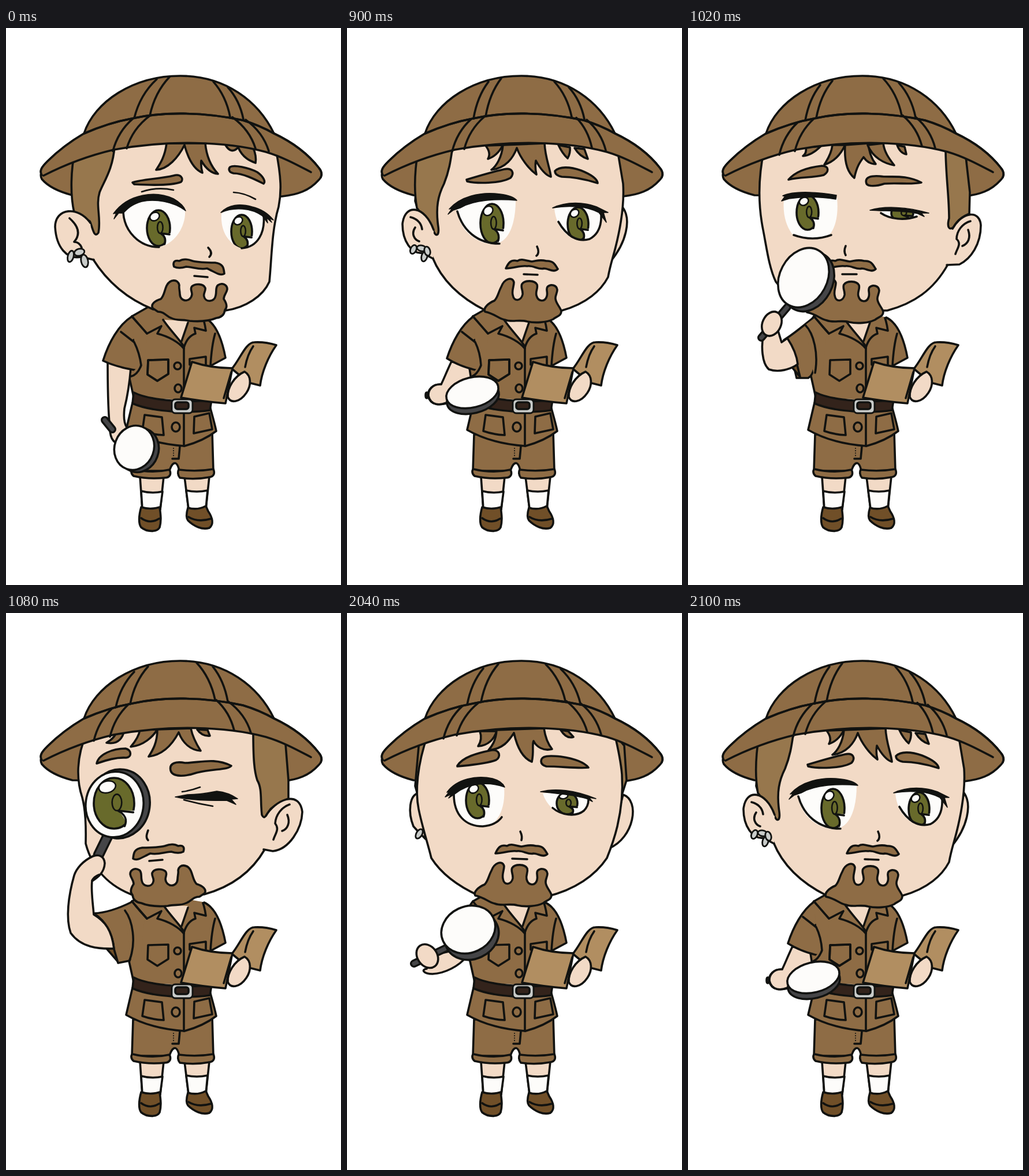
Write an HTML page that moves like this. It is 580x966 px and loops after 2160 ms.

```html
<!DOCTYPE html>
<html lang="en">
<head>
<meta charset="utf-8">
<title>Explorer</title>
<style>
html, body { margin: 0; width: 100%; height: 100%; overflow: hidden; background: #fff; }
svg { display: block; width: 100%; height: 100%; stroke: #111210; stroke-width: 3.6; stroke-linejoin: round; stroke-linecap: round; fill: none; }
.brown { fill: #8e6c45; }
.side { fill: #97774d; }
.skin { fill: #f2dac6; }
.white { fill: #fdfcfa; }
.iris { fill: #686a2b; }
.ink { fill: #111210; stroke-width: 1.5; }
.dark { fill: #454547; }
.belt { fill: #33231b; }
.paper { fill: #b18e61; }
.shoe { fill: #704f28; }
.metal { fill: #c9ccca; stroke-width: 2.8; }
.bare { stroke: none; }
.thin { stroke-width: 2.6; }
.pupil * { vector-effect: non-scaling-stroke; }
</style>
</head>
<body>
<svg id="stage" viewBox="0 0 580 966"></svg>
<script>
const path = (cls, ...ds) => ds.map(d => `<path class="${cls}" d="${d}"/>`).join('');
const line = (...ds) => path('line', ...ds);
const oval = (cls, x, y, rx, ry, turn = 0) =>
  `<ellipse class="${cls}" rx="${rx}" ry="${ry}" transform="translate(${x} ${y}) rotate(${turn})"/>`;
const place = (art, transform) => `<g transform="${transform}">${art}</g>`;

// Clothes, legs and map stay still.
const body = [
  path('skin', 'M232 778L236 835H267L273 778Z', 'M309 778L316 834H346L352 778Z'),
  path('white', 'M234 803Q252 808 271 804L267 834H236Z', 'M312 802Q330 806 349 802L346 834H316Z'),
  path('shoe', 'M234 831C230 845 229 860 234 866C245 875 262 874 266 866C269 855 268 845 266 831Q250 836 234 831Z',
    'M315 832C312 842 312 850 315 854C325 864 340 871 352 867C360 861 358 850 350 838L346 829Q331 837 315 832Z'),
  line('M234 850Q249 861 265 851', 'M316 848Q332 858 355 851'),
  path('brown', 'M220 705L218 768H283C286 758 290 753 294 755C298 757 299 764 300 768H359L357 700Z',
    'M219 765Q252 773 283 766C287 774 283 780 275 780Q247 783 221 777C216 773 216 767 219 765Z',
    'M299 766Q330 770 359 765C362 772 360 778 352 779Q326 784 301 780C297 775 297 769 299 766Z'),
  line('M301 726L299 747H288'),
  '<path d="M290 729V743" stroke-width="2" stroke-dasharray="0.1 4"/>',
  path('brown bare', 'M246 484L218 500C205 515 200 550 207 592L213 604L221 640L352 648L355 580L362 530L346 502L300 494Z'),
  line('M246 484L218 500C205 515 200 550 207 592L213 604L221 640', 'M355 582L353 648'),
  path('brown', 'M343 502C365 512 375 545 380 572L354 586Q356 551 362 530'),
  path('brown', 'M219 650L208 697Q250 721 309 725Q342 716 364 699C360 680 355 665 352 652Z'),
  path('skin bare', 'M272 506Q288 530 304 546L315 508Z'),
  line('M218 500Q229 514 244 530L269 517L262 530C282 535 299 545 308 556', 'M272 506C284 524 299 538 307 551', 'M315 511L304 543',
    'M308 554C312 541 319 533 328 530L326 520L346 525Q344 511 341 503', 'M308 553V725',
    'M246 576L281 575L281 600L262 612L245 601Z', 'M318 584V574L346 570V584',
    'M240 671L270 675L273 706Q253 705 236 699Z', 'M326 674L352 668L357 696L325 703Z'),
  oval('', 297, 586, 6, 6), oval('', 298, 625, 6, 7), oval('', 294, 692, 7, 8),
  path('belt', 'M221 632C250 647 320 650 356 645L353 663C320 668 255 667 219 651Z'),
  '<rect class="metal" x="287" y="644" width="36" height="24" rx="6"/><rect class="belt" x="293" y="649" width="23" height="12" rx="4"/>',
  path('paper', 'M391 591C405 575 415 545 430 545Q449 544 468 550C454 570 443 596 440 620L420 615Z',
    'M322 579Q355 590 392 590L380 651Q343 648 303 641Z'),
  line('M390 597L377 642', 'M428 552Q418 566 414 588'),
  path('skin', 'M413 596C425 603 425 620 416 633C405 649 389 652 384 640C383 624 395 604 413 596Z')
].join('');

const domeLine = 'C153 128 220 83 302 83C380 83 437 127 464 183';
const brimTop = 'M62 255C57 247 63 240 72 231C96 207 118 193 135 183C165 170 190 162 218 157C270 145 340 145 410 160C430 166 450 175 464 183C500 200 525 221 542 243';
const brimEdge = 'C505 238 480 224 450 215C380 196 280 194 187 211C140 222 100 238 65 256';
const hatBack = path('brown', brimTop + 'C549 252 547 258 541 264C525 282 505 289 478 292L115 290C92 284 72 274 62 262Q58 255 63 244');

const domeY = x => 84 + (x - 302) ** 2 * .0028;
const seamY = x => 148 + (x - 312) ** 2 * .00105;
const edgeY = x => 199 + (x - 320) ** 2 * .0008;
const bend = (x1, y1, x2, y2) =>
  line(`M${x1} ${y1}Q${x2 + (x1 - x2) * .25} ${y1 + (y2 - y1) * .4} ${x2} ${y2}`);

// Each strap: x at crown, at dome rim, at brim start, at brim edge.
const hatFront = straps => [
  path('brown bare', `${brimTop}L528 250${brimEdge}Z`),
  path('brown', `M135 183${domeLine}C450 175 430 166 410 160C340 145 270 145 218 157C190 162 165 170 135 183Z`),
  line(brimTop + 'C547 249 547 254 545 259', `M528 250${brimEdge}`),
  ...straps.map(([a, b, c, d]) => bend(a, domeY(a), b, seamY(b)) + bend(c, seamY(c), d, edgeY(d)))
].join('');

const turnedGoatee = path('brown', 'M254 486C250 479 258 473 268 470C274 464 274 456 278 447C284 435 298 435 300 446C299 452 301 455 301 462C302 476 320 476 322 462C322 456 318 452 322 448C328 443 342 443 345 451C346 457 341 460 343 466C345 476 361 476 363 464C365 457 362 450 367 446C374 441 383 445 383 453C382 460 377 463 377 470C381 476 384 484 379 489C378 498 372 502 364 503C350 509 330 509 318 508C305 505 296 508 286 503C277 500 275 492 263 492Z');
const goatee = path('brown', 'M239 492C235 486 245 477 255 473C261 468 262 458 267 449C272 435 286 430 289 441C289 448 285 455 287 463C289 476 302 473 304 462C305 455 300 449 303 444C308 437 325 437 329 445C331 452 326 456 328 464C331 475 343 476 346 465C348 458 344 453 347 449C353 443 363 446 364 454C364 460 360 464 361 470C362 478 369 484 371 491C371 500 362 500 357 505C345 511 325 512 312 509C298 505 285 511 273 506C260 503 257 496 239 492Z');
const turnedMoustache = path('brown', 'M291 414C288 406 292 402 300 404C308 399 318 402 323 404Q335 407 362 407C376 409 377 416 378 426C370 431 360 422 348 417C335 420 322 414 312 414Q299 418 291 414Z');
const moustache = path('brown', 'M275 417C279 408 283 401 295 404C303 399 310 404 320 405C329 404 333 401 345 404C358 403 361 412 365 418C358 425 349 417 341 417C332 420 322 411 312 413C300 411 290 417 275 417Z');
const mirror = art => place(art, 'translate(598 0) scale(-1 1)');

const iris = (x, y, rx, ry) => `<g class="pupil" transform="translate(${x} ${y}) scale(${rx / 21} ${ry / 31})">` + [
  oval('iris', 0, 0, 21, 31),
  path('white bare', 'M4 9L23 9L20 24L12 32C14 20 8 14 4 9Z'),
  line('M20 11L4 9C12 14 14 20 11 28'),
  oval('iris thin', 3, -1, 5, 10),
  oval('white thin', -7, -20, 9, 7, -25)
].join('') + '</g>';

let eyes = 0;
const eye = (white, outline, lash, pupil) => {
  const id = 'eye' + eyes++;
  return `<clipPath id="${id}"><path d="${white}"/></clipPath>` + path('white bare', white) +
    `<g clip-path="url(#${id})">${iris(...pupil)}</g>` + line(outline) + path('ink', lash);
};

const lens = (x, y, rx, ry, turn, dx, dy) =>
  oval('dark', x + dx, y + dy, rx, ry, turn) + oval('white', x, y, rx, ry, turn);
const handle = (d, width = 14) =>
  `<path d="${d}" stroke-width="${width}"/><path d="${d}" stroke="#454547" stroke-width="${width - 7}"/>`;

const poses = {
  reading: {
    arm: path('skin', 'M176 580C176 620 176 660 180 695C180 714 189 723 200 720L215 700C205 690 203 680 205 660C210 640 214 615 216 590Z') +
      path('brown', 'M217 501C195 515 178 545 168 577Q190 588 228 594L234 584C232 568 228 553 221 541') +
      path('brown bare', 'M217 503L222 541L232 584L216 600L236 602L245 531Z') +
      line('M218 500L244 530', 'M199 527L222 545C228 557 232 570 234 585Q228 601 217 604', 'M246 576L281 575L281 600L262 612L245 601Z') +
      handle('M171 680L184 696') + lens(222, 728, 34, 39, 20, 8, 4),
    face: path('skin', 'M125 212L115 300L150 400C175 440 210 470 255 488L380 490C415 485 445 465 456 440C460 400 460 350 472 310C477 285 477 260 467 210Q300 165 125 212Z') +
      path('side', 'M120 210C112 245 111 290 118 320L145 335C150 345 152 366 160 355C165 330 155 308 162 285C170 265 185 245 188 205Z') +
      path('skin', 'M146 338C125 308 85 312 85 345C87 380 105 402 130 397L152 402') +
      line('M110 330C126 344 129 358 118 371Q127 371 131 381') +
      oval('metal', 112, 396, 5, 10, 15) + oval('metal', 127, 389, 9, 6, -15) + oval('metal', 136, 404, 6, 11, -12),
    hair: path('brown', 'M278 200C275 225 265 238 260 246C280 245 298 225 309 203C315 225 325 245 340 251Q337 240 338 230C345 242 355 252 367 253C354 239 347 222 345 200Z',
        'M380 203Q390 220 402 207C410 226 424 231 432 234Q434 222 428 208L390 200Z') +
      path('brown', 'M219 268C235 262 265 262 290 256C303 252 308 262 303 267C285 274 240 272 222 271Z',
        'M388 241C395 237 420 242 435 250C445 257 450 266 446 270C430 262 410 252 394 252C385 250 385 244 388 241Z') +
      path('thin', 'M235 284Q262 275 290 281', 'M394 285Q413 286 432 297'),
    eyes: eye('M203 320C225 294 275 292 310 316C312 345 290 380 258 380C225 378 204 352 203 320Z', 'M203 320C205 352 230 380 265 380',
        'M187 331L191 321L186 322C212 286 260 282 290 296C302 303 308 309 311 317C290 301 258 296 235 301C215 307 209 315 203 321L195 321Z', [264, 347, 20, 31]) +
      eye('M373 322C392 307 430 308 446 324C448 355 435 382 408 382C385 375 371 352 373 322Z', 'M446 324C449 355 436 380 408 382',
        'M372 320C385 306 405 304 426 310C443 314 455 323 463 333L456 330L460 337L451 329L453 338L444 326C425 312 395 310 372 320Z', [408, 353, 18, 29]),
    nose: 'M350 381C357 388 356 393 352 397M326 430L349 432',
    moustache: turnedMoustache, goatee: turnedGoatee,
    straps: [[261, 222, 220, 185], [283, 249, 249, 209], [359, 388, 392, 432], [384, 411, 415, 455]]
  },
  lifting: {
    arm: path('skin', 'M181 578C172 597 168 608 163 618C148 617 140 628 140 638C145 656 162 654 176 650L215 610L212 590Z') +
      path('brown', 'M218 501C198 515 182 545 173 573Q195 587 226 594L233 584C231 568 228 553 221 541') +
      path('brown bare', 'M218 503L222 541L231 584L216 600L236 602L245 531Z') +
      line('M218 500L244 530', 'M199 527L222 545C228 557 231 570 232 585Q226 600 217 604', 'M246 576L281 575L281 600L262 612L245 601Z') +
      oval('dark', 138, 637, 2, 5) + path('skin', 'M163 618C148 617 140 628 141 638C145 656 162 654 172 650') +
      lens(217, 632, 46, 26, -14, 1, 10),
    face: path('skin', 'M478 312C492 332 484 372 456 405Z') +
      path('skin', 'M125 212L118 300L148 398C165 440 200 470 240 490L372 490C415 478 440 455 452 432C456 410 460 400 465 380C475 340 480 300 478 270L468 210Q300 165 125 212Z') +
      path('side', 'M123 212C116 255 117 290 121 312L148 348C154 365 160 360 158 345C153 310 158 290 168 270C178 245 180 225 183 205Z') +
      path('skin', 'M150 350C135 308 100 303 96 340C96 370 112 392 130 390L149 400') +
      line('M110 328Q128 333 130 349M118 346C111 356 116 367 125 370') +
      oval('metal', 115, 384, 5, 8, 25) + oval('metal', 129, 382, 8, 5, 10) + oval('metal', 134, 396, 5, 9, 15) + oval('metal', 139, 387, 5, 8, -15),
    hair: path('brown', 'M240 204Q250 217 244 227Q260 222 270 203Z',
        'M270 203C268 225 258 240 250 246C275 243 288 225 294 208C300 225 315 245 328 254Q325 242 327 230C335 245 345 256 353 258C352 245 343 225 342 200Z',
        'M366 203Q373 218 382 226Q387 217 386 207Z', 'M394 208Q403 223 417 227L411 210Z') +
      path('brown', 'M207 263C230 256 250 250 272 245C287 242 290 252 283 260C265 270 225 270 208 266Z',
        'M360 248C368 240 385 240 405 247C425 255 433 262 434 269C415 263 390 258 372 258C362 256 360 252 360 248Z'),
    eyes: eye('M190 315C215 296 260 292 292 299C292 340 280 374 252 375C220 372 195 350 190 315Z', 'M191 318C200 350 225 374 264 374',
        'M175 323L182 313L177 314C195 293 230 283 265 288C280 290 290 294 294 299C260 296 220 298 196 312L184 316Z', [251, 339, 20, 34]) +
      eye('M359 313C385 304 425 307 440 322C442 350 430 369 405 369C380 365 362 345 359 313Z', 'M366 336C380 361 400 372 420 366C435 358 441 342 440 322',
        'M356 312C380 300 412 302 432 310L452 320L444 320L449 337L436 320C415 309 385 307 356 312Z', [400, 340, 18, 29]),
    nose: 'M329 379C333 387 331 393 328 395M306 427L330 428',
    moustache, goatee,
    straps: [[245, 219, 215, 182], [267, 240, 238, 203], [359, 389, 397, 424], [384, 411, 415, 448]]
  },
  raising: {
    arm: path('skin', 'M138 617C128 618 132 626 148 626C170 625 194 612 206 597L190 584L150 593Z') +
      handle('M116 608L178 578') + oval('skin', 139, 595, 17, 22, -35) + lens(210, 549, 48, 40, -25, 6, 11),
    face: path('skin', 'M124 312C108 316 105 345 115 370Q122 378 136 392Z', 'M478 315C508 325 497 390 454 408Z') +
      path('side', 'M126 210L118 300L122 314L142 210Z', 'M463 210L477 312L484 290L480 230Z') +
      path('skin', 'M140 210C121 265 118 310 124 340C130 370 140 400 146 425C165 455 195 475 228 490L345 492C395 480 430 455 450 425C456 410 462 395 468 370C475 340 478 310 476 280Q474 255 463 208Q300 165 140 210Z') +
      oval('metal', 125, 383, 5, 9, 30),
    hair: path('brown', 'M230 205Q235 219 227 231C245 230 255 218 259 205Z',
        'M259 203C258 222 250 232 245 238C270 236 280 222 289 208C295 235 305 252 320 258C324 240 320 230 323 222C328 232 340 240 355 236C347 226 343 214 341 200Z',
        'M370 203Q380 219 392 215L383 205Z') +
      path('brown', 'M191 265C200 250 225 243 250 238C265 236 267 250 258 255C240 262 210 264 191 266Z',
        'M336 257C336 247 350 247 370 249C390 252 410 258 418 268C400 270 370 266 345 266C338 264 336 260 336 257Z'),
    eyes: eye('M185 315C205 293 245 290 272 302C275 340 260 370 235 371C205 369 185 350 185 315Z', 'M185 315C185 350 205 370 235 370Q258 368 268 354',
        'M170 319L177 310L173 311C190 287 225 281 252 287C263 290 270 295 273 302C245 292 210 295 188 313L176 321L181 314Z', [226, 325, 20, 31]) +
      eye('M339 313C365 309 400 312 419 322C416 340 403 350 383 350C360 348 345 332 339 313Z', 'M356 338C370 350 395 355 410 343Q418 335 418 324',
        'M335 310C360 303 395 307 431 322L419 320L425 327L415 322C390 315 360 313 335 310Z', [381, 330, 18, 19]),
    nose: 'M300 379Q304 387 302 394M286 426L312 427',
    moustache: place(moustache, 'translate(-18 0)'), goatee: place(goatee, 'translate(-17 -2)'),
    straps: [[236, 208, 200, 167], [262, 232, 228, 190], [344, 378, 380, 416], [370, 404, 405, 440]]
  },
  nearing: {
    sleeve: path('brown', 'M219 501C195 520 180 533 166 541C178 560 184 590 188 607L208 607Q220 602 222 560') +
      path('brown bare', 'M219 503L203 515L218 604L234 590L240 530Z') + line('M218 500L244 530', 'M203 515C218 530 226 565 220 598') +
      path('shoe', 'M178 586L194 605L188 580Z'),
    arm: path('skin', 'M131 528C126 552 128 582 140 592C157 598 178 592 190 583C188 565 180 550 172 538L162 545L155 522Z') +
      handle('M127 537L172 484') + oval('skin', 145, 513, 16, 22, 25) + lens(200, 433, 41, 54, 28, 9, 7),
    face: path('skin', 'M132 210C120 265 122 310 130 350C136 380 140 415 152 440C170 465 200 480 225 490L345 490C390 478 425 455 450 410L475 330L487 290L480 215Q300 165 132 210Z') +
      path('side', 'M446 208C446 255 452 290 452 330C448 345 452 352 460 345C468 330 480 325 487 322L488 285L480 215Z') +
      path('skin', 'M458 348C475 318 505 315 507 342C507 375 490 400 470 410L448 411') +
      line('M489 335C475 339 465 352 465 366C474 374 466 382 463 392', 'M485 350C490 364 485 374 475 378'),
    hair: path('brown', 'M204 207Q206 217 199 222Q214 221 230 205Z', 'M250 203C248 220 240 230 236 237C253 232 265 218 272 203Z',
        'M272 203C270 235 278 252 288 260C292 240 298 232 304 224Q312 236 325 236C320 230 314 218 312 200Z',
        'M311 203C320 225 340 235 357 238C347 225 340 215 338 200Z', 'M362 203Q367 217 378 219L375 206Z') +
      path('brown', 'M174 263C185 250 205 242 232 239C246 240 243 250 235 255C215 260 195 258 174 263Z',
        'M309 270C305 258 318 256 332 257C350 260 375 253 404 268C385 272 365 268 340 270C325 275 312 275 309 270Z'),
    eyes: eye('M166 296C195 288 235 290 258 295C261 325 255 352 240 363C220 368 195 366 180 357C168 340 164 320 166 296Z', 'M183 359Q216 371 248 359',
        'M162 300L168 292L164 291C185 281 230 285 257 290L256 297C225 292 195 293 175 296Z', [207, 320, 19, 30]) +
      eye('M334 318Q370 313 403 322C390 333 350 334 334 318Z', 'M334 321C350 332 375 334 396 327',
        'M315 316C340 308 380 310 417 321L404 321L409 327L398 322C370 316 340 318 315 316Z', [371, 321, 19, 15]),
    nose: 'M273 378Q269 387 273 394M267 427L292 427',
    moustache: place(moustache, 'translate(-40 0)'), goatee: place(goatee, 'translate(-33 1)'),
    straps: [[229, 203, 190, 158], [250, 222, 218, 185], [338, 370, 372, 405], [365, 394, 395, 428]]
  },
  peering: {
    sleeve: path('shoe', 'M168 575L194 605L188 580Z') +
      path('brown', 'M218 501C200 510 175 520 152 521C175 535 185 560 187 583L194 607L214 603Q220 590 222 560') +
      path('brown bare', 'M218 503L205 515L217 602L234 590L240 530Z') + line('M218 500L244 530', 'M206 516C219 533 226 570 214 602'),
    arm: handle('M160 420L179 381', 19) +
      path('skin', 'M152 523C150 500 147 480 149 465C160 458 170 450 171 434C170 421 160 418 150 422C133 430 122 443 118 455C108 490 103 530 112 555C130 580 160 583 187 582C183 550 172 535 152 523Z') +
      line('M149 464Q153 457 161 454') +
      oval('dark', 196, 331, 53, 60, 8) + oval('white', 188, 332, 50, 57, 8) +
      iris(187, 330, 35, 44),
    face: path('skin', 'M140 208C121 250 122 290 132 320C140 350 138 385 138 400C150 445 180 475 222 490L343 488C390 475 425 450 448 410L470 335L487 290L483 215Q300 165 140 208Z') +
      path('side', 'M428 205C428 255 430 275 435 290C444 305 440 325 443 350C448 360 450 350 458 340C470 330 480 325 489 322L489 290L483 215Z') +
      path('skin', 'M450 352C465 325 508 305 513 345C512 375 490 410 462 413L446 410') +
      line('M491 332C477 337 467 350 466 365C474 375 466 383 463 393', 'M487 350C493 364 487 375 478 378'),
    hair: path('brown', 'M192 203Q190 216 174 225C190 228 201 222 205 203Z', 'M232 202C230 215 222 225 216 232C238 230 254 215 262 202Z',
        'M262 202C262 225 254 238 247 249C272 246 288 228 299 207C306 226 320 238 337 239C330 228 323 215 320 200Z',
        'M331 202Q339 214 353 213L349 203Z') +
      path('brown', 'M157 261C160 245 185 235 207 235C218 238 218 250 208 251C190 250 175 255 157 261Z',
        'M285 273C282 260 295 257 310 260C335 260 360 250 390 265C385 272 360 270 330 277C310 284 288 285 285 273Z'),
    eyes: path('ink', 'M293 319L314 315C335 315 350 312 365 309Q385 311 401 322L390 323L398 332L382 325C350 326 320 325 293 319Z') +
      path('thin', 'M305 310Q320 308 336 302', 'M308 324Q333 331 358 335'),
    nose: 'M246 377C243 385 242 390 246 394M248 430L271 428',
    moustache: mirror(turnedMoustache), goatee: mirror(turnedGoatee),
    straps: [[222, 190, 184, 152], [246, 215, 212, 180], [330, 362, 364, 395], [358, 384, 385, 424]]
  }
};

const draw = p => [p.sleeve || '', hatBack, p.face, p.hair, hatFront(p.straps), p.eyes, line(p.nose), p.moustache, p.goatee, p.arm].join('');

const steps = [['reading', 900], ['lifting', 60], ['raising', 60], ['nearing', 60],
  ['peering', 900], ['nearing', 60], ['raising', 60], ['lifting', 60]];
const duration = steps.reduce((sum, [, ms]) => sum + ms, 0);

const stage = document.getElementById('stage');
stage.innerHTML = body + Object.entries(poses).map(([name, p]) => `<g id="${name}">${draw(p)}</g>`).join('');

for (const name of Object.keys(poses)) {
  let time = 0;
  const frames = steps.map(([pose, ms]) => {
    const frame = { offset: time / duration, opacity: pose === name ? 1 : 0, easing: 'step-end' };
    time += ms;
    return frame;
  });
  frames.push({ offset: 1, opacity: frames[0].opacity });
  document.getElementById(name).animate(frames, { duration, iterations: Infinity });
}
</script>
</body>
</html>
```
